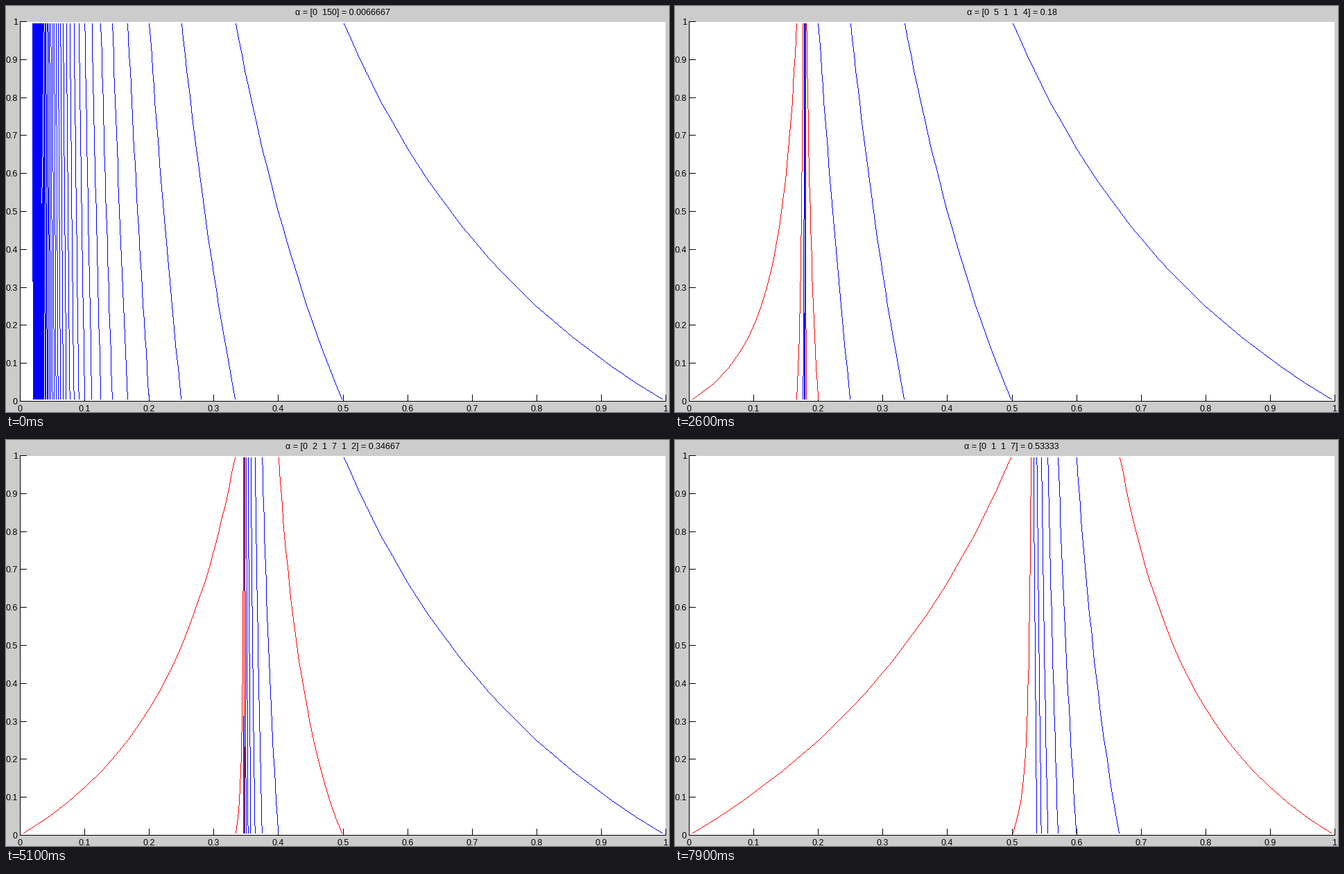
Write a matplotlib script that moves like this. It is 956 px wide and 586 px high and loops after 8000 ms.

```python
import matplotlib as mpl
import matplotlib.pyplot as plt
import numpy as np
from matplotlib.animation import FuncAnimation

W, H, DPI = 956, 586, 100
LEFT, RIGHT, TOP, BOTTOM = 20, 951, 22, 570  # pixel columns and rows of the plot box
DENOM, FRAMES, MAX_CURVES = 150, 80, 50
TICK = 9
GRAY, WHITE, BLACK = (204,) * 3, (255,) * 3, (0,) * 3
RED, BLUE = (255, 0, 0), (0, 0, 255)

mpl.rcParams["font.family"] = "Liberation Sans"
mpl.rcParams["font.size"] = 12.5 * 72 / DPI

T = np.linspace(0.005, 0.995, 25)


def to_px(x, y):
    """Nearest pixel column and row for data coordinates."""
    px = LEFT + (RIGHT - LEFT) * np.asarray(x)
    py = BOTTOM - (BOTTOM - TOP) * np.asarray(y)
    return np.stack([np.rint(px), np.rint(py)], axis=-1).astype(int)


def stroke(img, path, color):
    """Draw a hard-edged, one pixel wide polyline."""
    for p, q in zip(path, path[1:]):
        steps = np.abs(q - p).max()
        cols, rows = np.rint(np.linspace(p, q, steps + 1)).astype(int).T
        img[rows, cols] = color


def quotients(num, den):
    """Partial quotients of num/den, for 0 < num < den."""
    out = []
    while num:
        out.append(den // num)
        num, den = den % num, num
    return out


def curve(prefix, tail):
    """Pixel path of [0; prefix, tail] as the height T varies."""
    for a in reversed(prefix):
        tail = a + 1 / tail
    return to_px(1 / tail, T)


def curves(quots):
    """Blue steps n -> n+1 within each quotient, then a red closing curve."""
    out = []
    for k, a in enumerate(quots):
        for n in range(1, a):
            out.append((curve(quots[:k], n + T), BLUE))
        out.append((curve(quots[:k], a + 1 / T), RED))
    return out[:MAX_CURVES]


def title_text(num, quots):
    width = len(str(max(quots))) + 2
    row = "".join(f"{q:{width}d}" for q in [0] + quots).strip()
    return f"α = [{row}] = {num / DENOM:.5g}"


fig = plt.figure(figsize=(W / DPI, H / DPI), dpi=DPI)
ax = fig.add_axes([0, 0, 1, 1])
ax.axis("off")

base = np.full((H, W, 3), GRAY, dtype=np.uint8)
base[TOP + 1:BOTTOM + 1, LEFT:RIGHT] = WHITE
base[TOP:BOTTOM + 1, LEFT] = BLACK
base[BOTTOM, LEFT:RIGHT + 1] = BLACK
for i in range(11):
    x, y = to_px(i / 10, i / 10)
    label = f"{i / 10:g}"
    base[BOTTOM - TICK:BOTTOM, x] = BLACK
    base[y, LEFT:LEFT + TICK + 1] = BLACK
    ax.text(x, 585, label, ha="center", va="baseline")
    ax.text(17, y + 5, label, ha="right", va="baseline")

title = ax.text((LEFT + RIGHT) / 2, 13, "", ha="center", va="baseline")
screen = ax.imshow(base, extent=(0, W, H, 0), aspect="auto", interpolation="nearest")
ax.set(xlim=(0, W), ylim=(H, 0))


def update(i):
    num = i + 1
    quots = quotients(num, DENOM)
    img = base.copy()
    for path, color in curves(quots):
        stroke(img, path, color)
    screen.set_data(img)
    title.set_text(title_text(num, quots))
    return screen, title


anim = FuncAnimation(fig, update, frames=FRAMES, interval=100,
                     repeat=True, repeat_delay=0)
plt.show()
```
